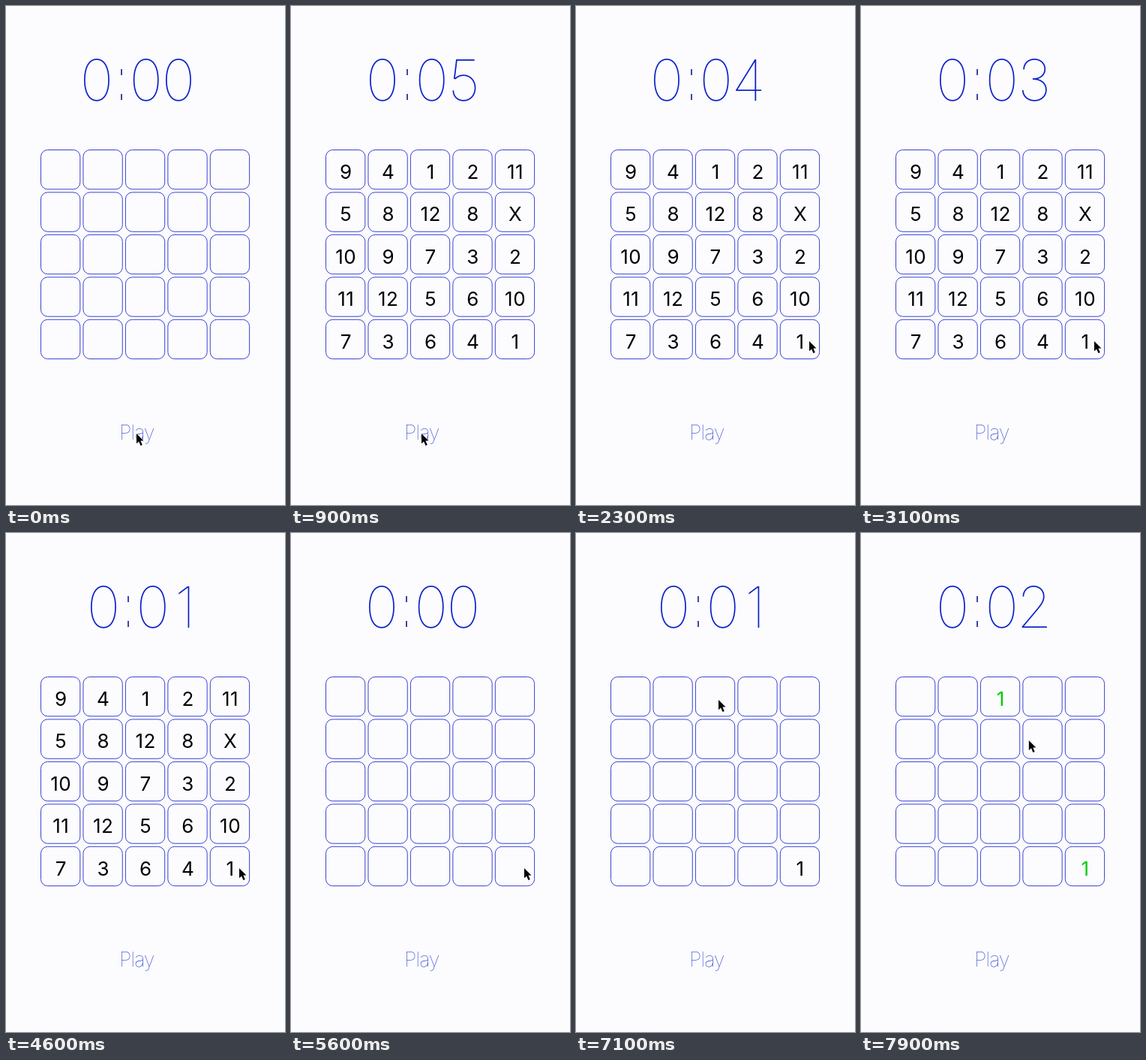
Animation of 372x664 px, one loop 8000 ms. Source, as an HTML page:

```html
<!DOCTYPE html>
<html lang="en">
<head>
<meta charset="utf-8">
<title>Number pairs</title>
<style>
  html, body { margin: 0; width: 100%; height: 100%; overflow: hidden; background: #fcfcff; }
  svg { display: block; width: 372px; height: 664px; }
  text { font-family: Inter, "Liberation Sans", sans-serif; }
  .clock text { font-size: 76px; font-weight: 100; text-anchor: middle; fill: #0a22c8; }
  .colon { fill: #0a1a90; }
  .tile { fill: none; stroke: #3a42d0; stroke-width: 1; }
  .num { font-size: 26px; letter-spacing: .5px; text-anchor: middle; }
  .play { font-size: 27px; font-weight: 100; letter-spacing: -1px; fill: #2a3ec8; }
  .cursor { fill: #000; stroke: #fff; stroke-width: 1; paint-order: stroke; }
</style>
</head>
<body>
<svg viewBox="0 0 372 664">
  <g class="clock" id="clock">
    <text x="121" y="125.5">0</text>
    <path class="colon" d="M153.2 84h1.6v8h-1.6zM153.2 117h1.6v8h-1.6z"/>
    <text x="186.7" y="125.5">0</text>
    <text x="230" y="125.5" id="last">0</text>
  </g>
  <g id="board"></g>
  <text class="play" x="151" y="576.8">Play</text>
  <path class="cursor" id="cursor" d="M0 0V13.2L3.1 10.4L5.5 16L7.8 15L5.4 9.6H9.5Z"/>
</svg>
<script>
const LOOP = 8000, DEAL = 500, HIDE = 5500, FIRST = 6100, MATCH = 7250;
const ROWS = ["9 4 1 2 11", "5 8 12 8 X", "10 9 7 3 2", "11 12 5 6 10", "7 3 6 4 1"];
const PITCH = 56.45, SIZE = 52.3;
const $ = id => document.getElementById(id);

function add(parent, tag, attrs, label = "") {
  const el = document.createElementNS("http://www.w3.org/2000/svg", tag);
  for (const key in attrs) el.setAttribute(key, attrs[key]);
  el.textContent = label;
  parent.append(el);
  return el;
}

const nums = ROWS.flatMap((row, r) => row.split(" ").map((label, c) => {
  const x = 46.5 + c * PITCH, y = 191.5 + r * PITCH;
  add($("board"), "rect", { class: "tile", x, y, width: SIZE, height: SIZE, rx: 9 });
  return add($("board"), "text", { class: "num", x: x + 26.8, y: y + 38.5 }, label);
}));
const topOne = nums[2], bottomOne = nums[24];

// The clock is centred, so it moves with the width of its last digit.
const SHIFT = [0, 9, 1, 1, 0, 1];

function seconds(t) {
  if (t < DEAL) return 0;
  if (t < HIDE) return 5 - Math.floor((t - DEAL) / 1000);
  return Math.floor((t - HIDE) / 1000);
}

// Time, x, y of the pointer tip.
const PATH = [
  [0, 174, 569], [1000, 174, 569], [1800, 311, 446], [5600, 311, 446],
  [5900, 311, 450], [6450, 311, 450], [7100, 190, 222], [7450, 190, 222], [8000, 227, 281]
];

function pointer(t) {
  const i = PATH.findIndex(p => p[0] > t);
  const [t0, x0, y0] = PATH[i - 1], [t1, x1, y1] = PATH[i];
  const u = (t - t0) / (t1 - t0), e = u * u * (3 - 2 * u);
  return [x0 + (x1 - x0) * e, y0 + (y1 - y0) * e];
}

function visible(num, t) {
  return (t >= DEAL && t < HIDE) ||
    (num === bottomOne && t >= FIRST) || (num === topOne && t >= MATCH);
}

const start = performance.now();

function draw() {
  const t = (performance.now() - start) % LOOP;
  const s = seconds(t);
  $("last").textContent = s;
  $("clock").setAttribute("transform", `translate(${SHIFT[s]} 0)`);
  for (const num of nums) {
    num.style.visibility = visible(num, t) ? "visible" : "hidden";
    num.style.fill = t >= MATCH ? "#0c0" : "#000";
  }
  $("cursor").setAttribute("transform", `translate(${pointer(t)})`);
  requestAnimationFrame(draw);
}
draw();
</script>
</body>
</html>
```
